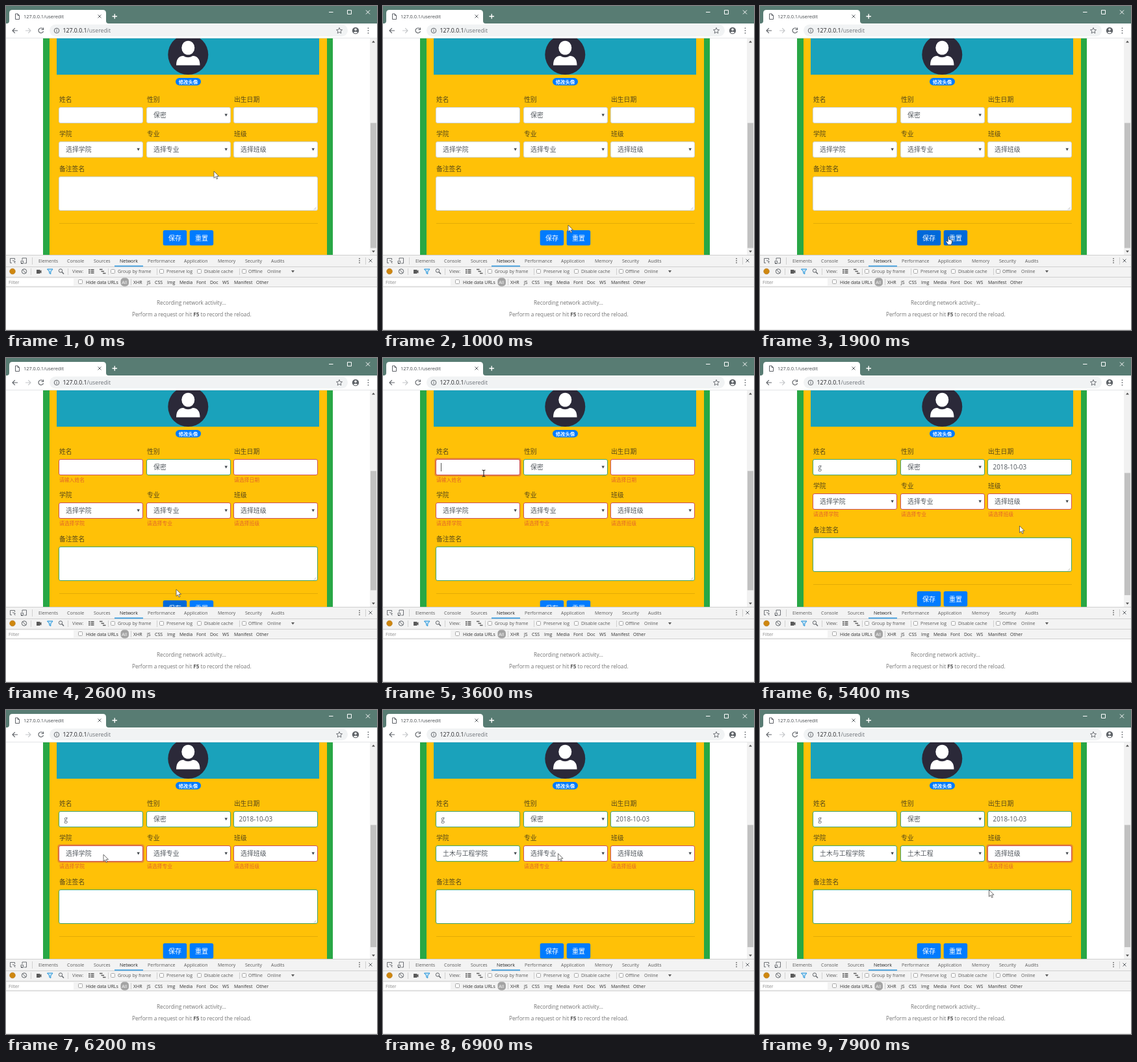
Recreate the animation shown at these times as an HTML page. Size 571 by 500 pixels, loop 8000 ms.

```html
<!DOCTYPE html>
<html lang="zh">
<head>
<meta charset="utf-8">
<title>useredit</title>
<style>
  html, body { margin: 0; width: 100%; height: 100%; overflow: hidden; background: #fff; }
  svg { display: block; width: 100vw; height: 100vh; }
  text { font-family: "Open Sans", "Noto Sans CJK SC", "Noto Sans CJK", sans-serif; white-space: pre; }
  .label { font-size: 9.8px; fill: #54461a; }
  .value { font-size: 9.9px; fill: #50565c; }
  .error { font-size: 7.8px; fill: #e2652b; }
  .btn { font-size: 10px; fill: #fff; text-anchor: middle; }
  .ui { font-size: 7px; fill: #5a5a5a; }
  .cell { font-size: 9.2px; fill: #212529; text-anchor: middle; }
  .line { fill: none; stroke: #5f6368; }
</style>
</head>
<body>
<svg id="stage" viewBox="0 0 571 500" xmlns="http://www.w3.org/2000/svg">
  <rect width="571" height="500" fill="#fff"/>
  <g id="page">
    <rect x="57" y="50" width="446" height="334" fill="#28a745"/>
    <rect x="67" y="50" width="427" height="334" fill="#ffc107"/>
    <rect x="78" y="50" width="404" height="56" fill="#1aa2bb"/>
    <circle cx="280.3" cy="75" r="31" fill="#2b2939"/>
    <ellipse cx="280.3" cy="64.5" rx="10" ry="10.8" fill="#fff"/>
    <path d="M262 91.5q0-14 11-14.5 7 4.600 14.500 0 11 .5 11 14.500z" fill="#fff"/>
    <rect x="261" y="111" width="39" height="11.500" rx="5.700" fill="#007bff"/>
    <text x="280.500" y="119.500" font-size="7.400" font-weight="700" fill="#fff" text-anchor="middle">修改头像</text>
  </g>
  <g id="bar">
    <rect x="560" y="50" width="11" height="334" fill="#f1f1f1"/>
    <path d="M563 56.500l2.500-3 2.500 3zM563 377.500l2.500 3 2.500-3z" fill="#505050"/>
    <rect id="thumb" x="561" width="9" fill="#c1c1c1"/>
  </g>
  <g id="browser">
    <rect width="571" height="27" fill="#587c73"/>
    <path d="M1 27q4 0 4-4V11q0-5 5-5h139q5 0 5 5v12q0 4 4 4z" fill="#fff"/>
    <path d="M14.500 12h3.500l2.500 2.500v6h-6zM18 12v2.500h2.500" class="line"/>
    <text x="27" y="19" font-size="7.350" fill="#45494d">127.0.0.1/useredit</text>
    <path d="M141.500 13.500l5 5m0-5l-5 5" class="line"/>
    <path d="M163.500 16h7.500m-3.750-3.750v7.500" stroke="#fff" stroke-width="1.400"/>
    <path d="M497 9.500h6.500M525.500 6.500h6v6h-6zM554 6.500l6 6m0-6l-6 6" fill="none" stroke="#fff"/>
    <rect y="27" width="571" height="23" fill="#fff"/>
    <path d="M0 49.500h571" stroke="#e3e5e7"/>
    <rect x="67" y="28.500" width="459" height="18.500" rx="9.200" fill="#f1f3f4"/>
    <path d="M18 38h-8m3.800-3.800L10 38l3.800 3.800" class="line" stroke-width="1.200"/>
    <path d="M30 38h8m-3.800-3.800L38 38l-3.800 3.800" fill="none" stroke="#c4c6c9" stroke-width="1.200"/>
    <path d="M56.600 35.200a3.800 3.800 0 1 0 .9 3.600M57.500 33.500v3h-3" class="line" stroke-width="1.200"/>
    <circle cx="78" cy="38" r="3.800" class="line"/>
    <path d="M78 37.500v2.500m0-4.200v1" class="line"/>
    <text x="87.500" y="41" font-size="8.750" fill="#202124">127.0.0.1<tspan fill="#70757a">/useredit</tspan></text>
    <path d="M513 33.500l1.300 3 3.200.3-2.400 2.100.7 3.200-2.800-1.700-2.800 1.700.7-3.200-2.400-2.100 3.200-.3z" class="line" stroke-width=".9"/>
    <circle cx="538" cy="38" r="5.200" fill="#5f6368"/>
    <circle cx="538" cy="36.200" r="1.700" fill="#fff"/>
    <path d="M534.700 41q3.300-3.200 6.600 0-3.300 2.700-6.600 0" fill="#fff"/>
    <path d="M557.500 33.500v1.600m0 2.100v1.600m0 2.100v1.600" stroke="#5f6368" stroke-width="1.600"/>
  </g>
  <g id="tools">
    <rect y="384" width="571" height="50" fill="#f3f3f3"/>
    <rect y="434" width="571" height="66" fill="#fff"/>
    <path d="M0 384.500h571M0 402.500h571M0 418.500h571M0 433.500h571" stroke="#cfcfcf"/>
    <path d="M0 499.500h571" stroke="#e4e4e4"/>
    <path d="M40.500 388v11M553.500 388v11M38.500 405v10M95.500 405v10M157.500 405v10M232.500 405v10M359.500 405v10M192.500 421v10" stroke="#d0d0d0"/>
    <rect x="167" y="400.500" width="44" height="1.800" fill="#3f9fe0"/>
    <path d="M9 396.500H6.500v-7h7V392M10 392.500l4.500 2-2 .7 1.800 2M25 396.500h-2v-3h3.500v4H23zM25 392v-3h6.500v8H28" class="line" stroke-width=".9"/>
    <path d="M544 389v1.500m0 1.700v1.500m0 1.700v1.500" stroke="#5a5a5a" stroke-width="1.500"/>
    <path d="M558.500 390.500l5 5m0-5l-5 5" class="line"/>
    <circle cx="10" cy="409.500" r="4.300" fill="#cf870f" stroke="#b5781c" stroke-width=".7"/>
    <circle cx="28" cy="409.500" r="3.700" class="line"/>
    <path d="M25.500 407l5 5" class="line"/>
    <path d="M47 407h5.500v1.700l2-1.200v5l-2-1.200v1.700H47z" fill="#5a5a5a"/>
    <path d="M63.500 406h8.500l-3.200 4v3.500l-2-1V410z" fill="#c4e3f6" stroke="#1a8fd8"/>
    <circle cx="84" cy="408.500" r="2.700" class="line"/>
    <path d="M86 410.500l3 3" class="line" stroke-width="1.400"/>
    <path d="M127 407h2.500m1 0h5M127 409.500h2.500m1 0h5M127 412h2.500m1 0h5" stroke="#5a5a5a" stroke-width="1.600"/>
    <path d="M144 406.500h4.500m-2 3h4.500m-2 3h4.500" stroke="#5a5a5a" stroke-width="1.300"/>
    <path d="M439 408h5l-2.500 3.500z" fill="#5a5a5a"/>
    <rect x="1" y="420.500" width="103" height="11" fill="#fff"/>
    <rect x="176.500" y="419.500" width="12.500" height="13" rx="5" fill="#a3a3a3"/>
    <g font-size="8.200" text-anchor="middle" fill="#747474">
      <text x="285.500" y="461">Recording network activity…</text>
      <text x="285.800" y="479">Perform a request or hit <tspan font-weight="700" fill="#5a5a5a">F5</tspan> to record the reload.</text>
    </g>
  </g>
  <g id="pointer"></g>
</svg>
<script>
const NS = "http://www.w3.org/2000/svg";
const byId = id => document.getElementById(id);
const set = (node, attrs) => { for (const k in attrs) node.setAttribute(k, attrs[k]); return node; };
const add = (parent, tag, attrs, text = "") => {
  const node = set(document.createElementNS(NS, tag), attrs);
  node.textContent = text;
  return parent.appendChild(node);
};
const show = (node, on) => node.setAttribute("visibility", on ? "inherit" : "hidden");
const moveTo = (node, x, y) => node.setAttribute("transform", `translate(${x} ${y})`);
const between = (v, a, b) => v >= a && v < b;

const LOOP = 8000, STEP = 100, SHIFT = 14, FADE = 150, BLINK = 1060;
const SAVE = 2600, NAME_FOCUS = 3300, NAME = 3900, DATE_FOCUS = 4600, DATE = 5200,
      COLLEGE_FOCUS = 5900, COLLEGE = 6400, MAJOR_FOCUS = 6900, MAJOR = 7400, CLASS_FOCUS = 7700;
const GREEN = "#3fa36a", RED = "#cc4f58", GREY = "#ced4da";

// Developer tools labels
const tools = byId("tools");
const word = (x, y, text, fill = "#5a5a5a") => add(tools, "text", { x, y, class: "ui", style: `fill:${fill}` }, text);
const words = (y, list, fill) => list.forEach(([x, text]) => word(x, y, text, fill));
words(396, [[50, "Elements"], [94, "Console"], [135, "Sources"], [218, "Performance"],
  [274, "Application"], [326, "Memory"], [368, "Security"], [408, "Audits"]]);
word(175, 396, "Network", "#222");
words(412.3, [[102, "View:"], [172, "Group by frame"], [247, "Preserve log"],
  [305, "Disable cache"], [373, "Offline"], [402, "Online"]]);
words(429, [[123, "Hide data URLs"], [196, "XHR"], [217, "JS"], [229, "CSS"], [248, "Img"],
  [267, "Media"], [293, "Font"], [314, "Doc"], [333, "WS"], [351, "Manifest"], [385, "Other"]], "#303030");
word(4, 429, "Filter", "#8a8a8a");
word(178.3, 429, "All", "#fff");
[[161, 406], [236, 406], [294, 406], [363, 406], [111, 422]].forEach(([x, y]) =>
  add(tools, "rect", { x: x + .5, y: y + .5, width: 6, height: 6, rx: 1, fill: "#fff", stroke: "#a8a8a8" }));

// Form
const page = byId("page");
const row2 = add(page, "g", {}), foot = add(page, "g", {});

function box(parent, x, y, width, height) {
  const glow = add(parent, "rect", { x: x - 1.7, y: y - 1.7, width: width + 3.4, height: height + 3.4, rx: 4 });
  const frame = add(parent, "rect", { x: x + .5, y: y + .5, width: width - 1, height: height - 1, rx: 2.5, fill: "#fff" });
  return { glow, frame };
}

function field(parent, x, y, label, error, select) {
  add(parent, "text", { x, y: y - 8, class: "label" }, label);
  const f = box(parent, x - 1, y, 130, 25);
  f.text = add(parent, "text", { x: x + (select ? 10 : 7.5), y: y + 16.1, class: "value" });
  f.error = add(parent, "text", { x, y: y + 35, class: "error" }, error);
  if (select) add(parent, "path", { d: `M${x + 119.5} ${y + 10.5}h4.400l-2.200 4z`, fill: "#3c4248" });
  return f;
}

const nameBox = field(page, 82, 156, "姓名", "请输入姓名");
const sexBox = field(page, 217, 156, "性别", "", true);
const dateBox = field(page, 351, 156, "出生日期", "请选择日期");
const collegeBox = field(row2, 82, 209, "学院", "请选择学院", true);
const majorBox = field(row2, 217, 209, "专业", "请选择专业", true);
const classBox = field(row2, 351, 209, "班级", "请选择班级", true);

add(foot, "text", { x: 82, y: 254.5, class: "label" }, "备注签名");
const noteBox = box(foot, 81, 263, 399, 53);
add(foot, "path", { d: "M473.500 314.500l4-4m-2 4l2-2", stroke: "#b5b5b5", "stroke-width": .7 });
add(foot, "path", { d: "M82 335.500h398", stroke: "#000", opacity: .1 });
const button = (x, text) => {
  const face = add(foot, "rect", { x, y: 346, width: 36.5, height: 23.5, rx: 2.5 });
  add(foot, "text", { x: x + 18.2, y: 361.5, class: "btn" }, text);
  return face;
};
const saveBtn = button(241.7, "保存"), resetBtn = button(282.7, "重置");
const caret = add(page, "rect", { y: 162, width: 1, height: 13, fill: "#555" });

// Date picker
const picker = add(page, "g", {});
add(picker, "rect", { x: 350.5, y: 181.5, width: 136.5, height: 154, rx: 3, fill: "#fff", stroke: "#6f6a5c" });
add(picker, "path", { d: "M355 182l4.500-4.500 4.500 4.500z", fill: "#fff" });
add(picker, "rect", { x: 465, y: 240, width: 19, height: 18.5, rx: 2.5, fill: "#dccda4" });
const cell = (col, y, text, style = "") => add(picker, "text", { x: 363 + col * 18.58, y, class: "cell", style }, text);
cell(0, 197.5, "«", "font-weight:700");
cell(3, 197.5, "2018年10月", "font-weight:700;font-size:9.8px");
cell(6, 197.5, "»", "font-weight:700");
[..."一二三四五六日"].forEach((d, i) => cell(i, 215.8, d, "font-weight:500"));
for (let i = 0; i < 42; i++) {
  const day = new Date(2018, 8, 24 + i);
  cell(i % 7, 234.3 + Math.floor(i / 7) * 18.55, day.getDate(), day.getMonth() === 9 ? "" : "fill:#8e8e8e");
}

// Pointer shapes
const pointer = byId("pointer");
const shape = (d, attrs) => add(pointer, "path", { d, ...attrs });
const shapes = {
  arrow: shape("M0 0v10.500l2.500-2.200 1.700 3.800 1.700-.8-1.700-3.600h3.300z", { fill: "#fff", stroke: "#4b4b4b", "stroke-width": .8 }),
  hand: shape("M-.8.8q.9-1.400 1.800 0v4.400l4.500 1.200v4l-1.200 3h-4.800l-3.600-5.200 1-.9 2.300 1.500z", { fill: "#fff", stroke: "#333", "stroke-width": .8 }),
  beam: shape("M-2.500-5q2 0 2.500 1 .5-1 2.500-1M0-4v8M-2.500 5q2 0 2.500-1 .5 1 2.500 1", { fill: "none", stroke: "#222", "stroke-width": 1.1 })
};

// time, x, y
const path = [
  [0, 320, 255], [200, 320, 255], [600, 285, 338], [1000, 285, 338], [1300, 262, 357],
  [1500, 262, 357], [1700, 270, 356], [1900, 290, 355], [2100, 290, 355], [2400, 262, 357],
  [2700, 262, 357], [3300, 155, 178], [4000, 155, 178], [4500, 423, 178], [4750, 423, 178],
  [5100, 400, 249], [5200, 400, 249], [5400, 399.5, 259], [5800, 150, 223], [6400, 150, 223],
  [6800, 269.5, 221.5], [7400, 269.5, 221.5], [7650, 372, 224], [7900, 352.5, 277.5], [8000, 352.5, 277.5]
];

function pointerAt(t) {
  let i = 0;
  while (i < path.length - 2 && t >= path[i + 1][0]) i++;
  const [t0, x0, y0] = path[i], [t1, x1, y1] = path[i + 1];
  const p = Math.max(0, (t - t0) / (t1 - t0)), e = p * p * (3 - 2 * p);
  return [x0 + (x1 - x0) * e, y0 + (y1 - y0) * e];
}

const errorShift = t => t < SAVE ? 0 : t < DATE ? 2 * SHIFT : SHIFT;

// What lies under the pointer
function hovered(t) {
  const [x, y] = pointerAt(t), fy = y - errorShift(t);
  if (between(fy, 346, 369.5)) {
    if (between(x, 241.7, 278)) return "save";
    if (between(x, 282.7, 319)) return "reset";
  }
  const inInput = between(y, 157, 180) && (between(x, 82, 210) || between(x, 351, 479));
  return inInput || between(x, 82, 479) && between(fy, 264.5, 315) ? "text" : "";
}

function drawPointer(t) {
  const now = hovered(t), before = hovered(t - FADE);
  const kind = { save: "hand", reset: "hand", text: "beam" }[now] || "arrow";
  moveTo(pointer, ...pointerAt(t));
  for (const k in shapes) show(shapes[k], k === kind);
  const shade = name => name === now || name === before ? "#0069d9" : "#007bff";
  saveBtn.setAttribute("fill", shade("save"));
  resetBtn.setAttribute("fill", shade("reset"));
}

// Focus rings fade in and out
function ring(t, from, to) {
  const clamp = v => Math.min(1, Math.max(0, v));
  return clamp((t - from) / FADE) * clamp(1 - (t - to) / FADE);
}

function paint(f, checked, valid, focus = 0) {
  const color = !checked ? GREY : valid ? GREEN : RED;
  f.frame.setAttribute("stroke", color);
  set(f.glow, { fill: color, opacity: focus * .45 });
  if (f.error) show(f.error, checked && !valid);
}

function draw(t) {
  const saved = t >= SAVE, named = t >= NAME, dated = t >= DATE;
  const college = t >= COLLEGE, major = t >= MAJOR;
  const inName = between(t, NAME_FOCUS, DATE_FOCUS), inDate = between(t, DATE_FOCUS, DATE);

  paint(nameBox, saved, named, ring(t, NAME_FOCUS, DATE_FOCUS - FADE));
  paint(sexBox, saved, true);
  paint(dateBox, saved, dated, ring(t, DATE_FOCUS, DATE));
  paint(collegeBox, saved, college, ring(t, COLLEGE_FOCUS, MAJOR_FOCUS - FADE));
  paint(majorBox, saved, major, ring(t, MAJOR_FOCUS, CLASS_FOCUS - FADE));
  paint(classBox, saved, false, ring(t, CLASS_FOCUS, LOOP));
  paint(noteBox, saved, true);

  nameBox.text.textContent = named ? "g" : "";
  sexBox.text.textContent = "保密";
  dateBox.text.textContent = dated ? "2018-10-03" : "";
  collegeBox.text.textContent = college ? "土木与工程学院" : "选择学院";
  majorBox.text.textContent = major ? "土木工程" : "选择专业";
  classBox.text.textContent = "选择班级";

  const shift = errorShift(t);
  moveTo(row2, 0, Math.max(0, saved && !dated ? SHIFT : 0));
  moveTo(foot, 0, shift);
  set(byId("thumb"), { y: 180.5 - shift * .22, height: 193 - shift * .32 });

  show(picker, inDate);
  const since = t - (inDate ? DATE_FOCUS : named ? NAME : NAME_FOCUS);
  show(caret, (inName || inDate) && since % BLINK < BLINK / 2);
  caret.setAttribute("x", inDate ? 358.5 : named ? 96 : 89);
  drawPointer(t);
}

const start = performance.now();
function tick() {
  const t = (performance.now() - start) % LOOP;
  draw(Math.floor(t / STEP) * STEP);
  requestAnimationFrame(tick);
}
tick();
</script>
</body>
</html>
```
